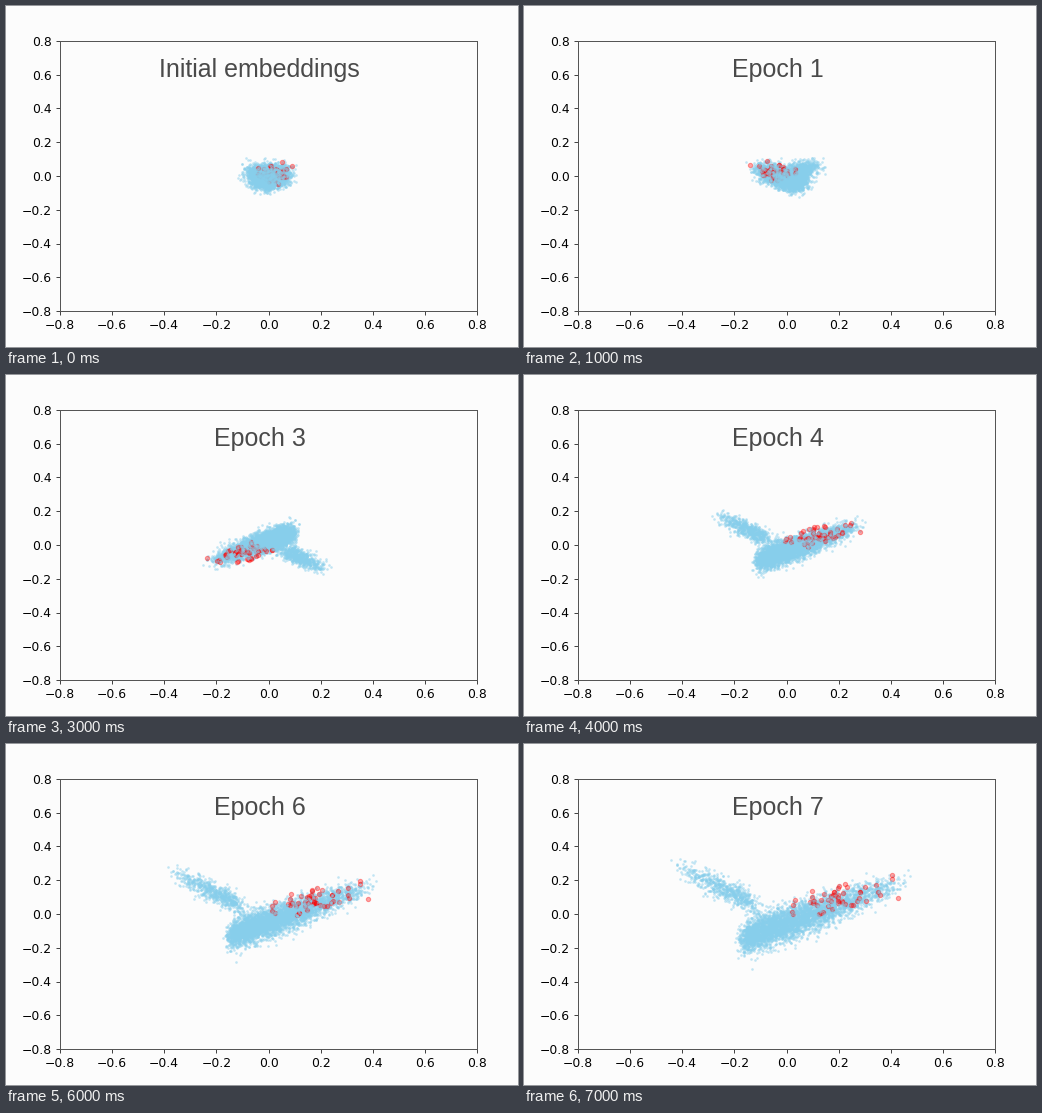
A matplotlib script that plays this animation: 512 by 341 pixels, repeating every 8 s.

```python
import numpy as np
import matplotlib.pyplot as plt
from matplotlib.animation import FuncAnimation

W, H, DPI = 512, 341, 64
PT = 72 / DPI                        # points per pixel
UNIT = np.array([260.3, 168.8])      # pixels per data unit
EPOCHS = 8
BG = "#fcfcfc"

rng = np.random.default_rng(7)


# Shapes are in pixels from the centre, as they look in the last epoch
def main_cloud(n):
    x = -44 + 172 * rng.beta(1.15, 2.5, n) + rng.normal(0, 3.5, n)
    sigma = np.interp(x, [-40, 30, 110], [8, 8.8, 5])
    y = -9 + 0.35 * x + sigma * rng.normal(size=n)
    return np.column_stack([x, y])


def side_arm(n):
    x = -32 - 90 * rng.beta(1.5, 2.9, n) + rng.normal(0, 5, n)
    y = -5 - 0.48 * x + rng.normal(0, 5.5, n)
    return np.column_stack([x, y])


def marked_words(n):
    x = rng.normal(58, 26, n)
    y = 9 + 0.12 * x + rng.normal(0, 8, n)
    return np.column_stack([x, y])


def noise(n):
    return rng.normal(size=(n, 2)) * (7.2, 4.7)


def place(shape, jitter, epoch):
    """Grow the learned shape while the initial noise fades out."""
    spread = 0.12 + 0.125 * epoch
    share = 1 - epoch / (EPOCHS - 1)
    # The projection's axes change sign between early epochs
    signs = (-1 if 1 <= epoch <= 3 else 1, -1 if 2 <= epoch <= 3 else 1)
    return (spread * shape + share * jitter) * signs / UNIT


blue = rng.permutation(np.vstack([main_cloud(4350), side_arm(650)]))
red = marked_words(50)
blue_noise, red_noise = noise(len(blue)), noise(len(red))
cut = int(0.9 * len(blue))           # the rest lies above the red dots

plt.rcParams.update({
    "font.family": "DejaVu Sans",
    "font.size": 12.4 * PT,
    "axes.linewidth": PT,
    "axes.edgecolor": "#555555",
})

fig = plt.figure(figsize=(W / DPI, H / DPI), dpi=DPI, facecolor=BG)
ax = fig.add_axes([54 / W, 36 / H, 417 / W, 270 / H], facecolor=BG)
ax.set(xlim=(-0.8, 0.8), ylim=(-0.8, 0.8))
ticks = np.linspace(-0.8, 0.8, 9)
ax.set_xticks(ticks)
ax.set_yticks(ticks)
ax.tick_params(width=PT, length=4.2 * PT, pad=3.6 * PT,
               color="#444444", labelcolor="black")


def dots(color, size, alpha, edge, z):
    return ax.scatter([], [], s=(size * PT) ** 2, c=color, alpha=alpha,
                      linewidths=edge * PT, zorder=z)


blue_low = dots("skyblue", 2.6, 0.5, 0, 1)
red_dots = dots("red", 4.3, 0.35, 1.1, 1.1)
blue_top = dots("skyblue", 2.6, 0.5, 0, 1.2)

title = fig.text(253.5 / W, (H - 71) / H, "", family="Liberation Sans",
                 size=25 * PT, color="#4a4a4a", ha="center", va="baseline")


def draw(epoch):
    pos = place(blue, blue_noise, epoch)
    blue_low.set_offsets(pos[:cut])
    blue_top.set_offsets(pos[cut:])
    red_dots.set_offsets(place(red, red_noise, epoch))
    title.set_text(f"Epoch {epoch}" if epoch else "Initial embeddings")
    return blue_low, red_dots, blue_top, title


anim = FuncAnimation(fig, draw, frames=EPOCHS, interval=1000,
                     repeat=True, repeat_delay=0)
plt.show()
```
